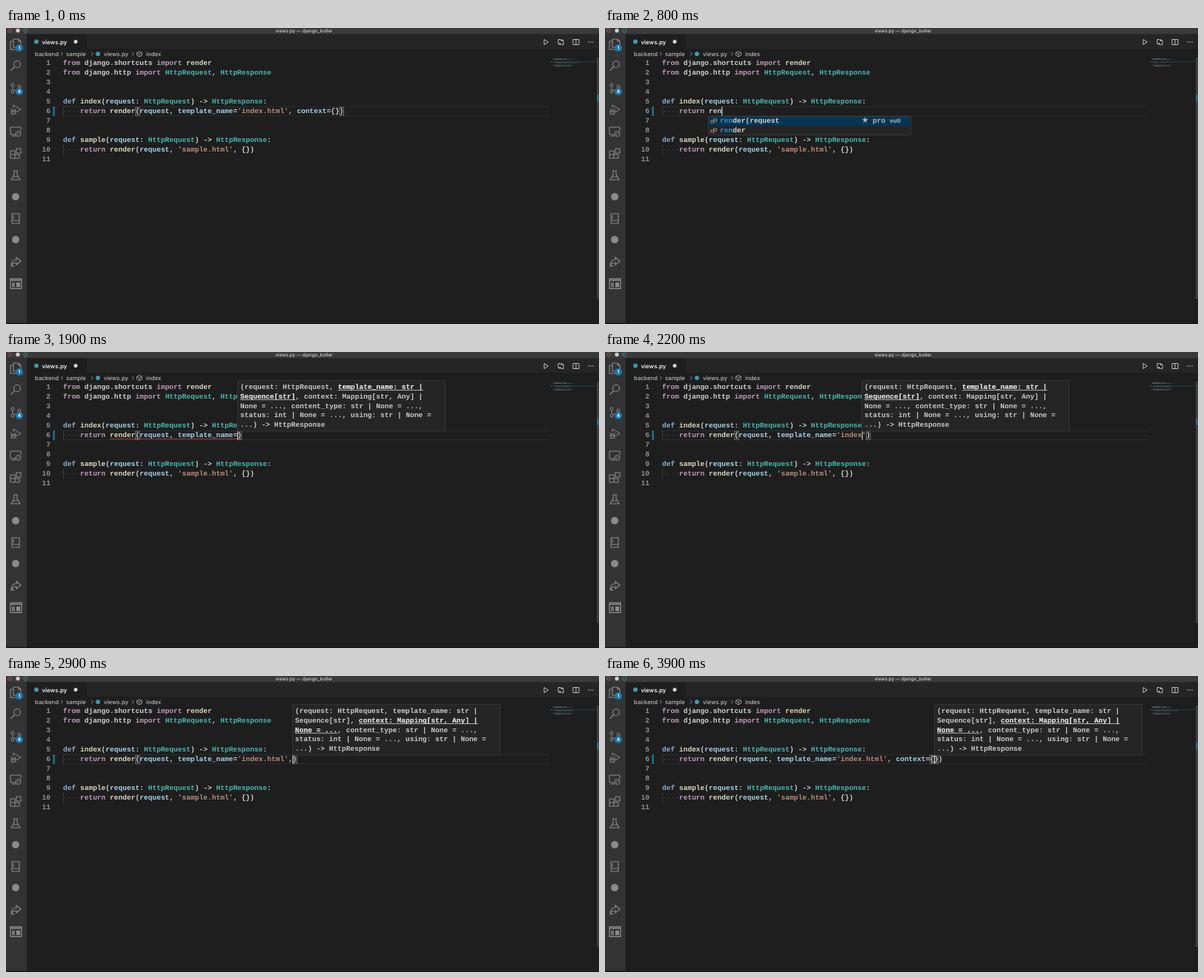
An HTML page with a canvas that plays this animation: 800x400 px, repeating every 4 s.

```html
<!DOCTYPE html>
<html lang="en">
<head>
<meta charset="utf-8">
<title>Editor</title>
<style>
html, body { margin: 0; width: 800px; height: 400px; overflow: hidden; background: #1e1e1e; }
canvas { display: block; width: 800px; height: 400px; }
</style>
</head>
<body>
<canvas id="stage" width="800" height="400"></canvas>
<script>
const ctx = document.getElementById('stage').getContext('2d');
const LOOP = 4000, STEP = 100;
const CHAR = 5.735, LEFT = 77, TOP = 41, ROW = 13;
const MONO = 'bold 9.56px "Liberation Mono", monospace';
const ui = (size, weight = 400) => `${weight} ${size}px Inter, sans-serif`;

const LINES = [
  'from django.shortcuts import render',
  'from django.http import HttpRequest, HttpResponse',
  '', '',
  'def index(request: HttpRequest) -> HttpResponse:',
  '',
  '', '',
  'def sample(request: HttpRequest) -> HttpResponse:',
  "    return render(request, 'sample.html', {})",
  ''
];
const SIGNATURE = [
  '(request: HttpRequest, template_name: str |',
  'Sequence[str], context: Mapping[str, Any] |',
  'None = ..., content_type: str | None = ...,',
  'status: int | None = ..., using: str | None =',
  '...) -> HttpResponse'
];
// Active parameter: [row, column, length]
const PARAMS = [
  [[0, 1, 20]],
  [[0, 23, 20], [1, 0, 13]],
  [[1, 15, 28], [2, 0, 10]]
];
const R_WORDS = 'request render return repr reversed range round raise reload reduce register resolve'.split(' ');
const RENDER = ['render(request', 'render'];
const T_WORDS = 'template_name= tuple type try True'.split(' ');
const C_WORDS = 'context= content_type= class continue chr callable classmethod complex compile copy count create'.split(' ');

const CALL = 'return render(request';
const NAMED = CALL + ', template_name=';
const PAGE = NAMED + "'index.html'";
// "|" marks the caret; list = [word column, matched text, items]
const STATES = [
  { at: 0, code: PAGE + ', context={})|', hideCaret: true },
  { at: 100, code: '|', error: true },
  { at: 200, code: 'r|', error: true, list: [4, 'r', R_WORDS] },
  { at: 300, code: 'ret|', error: true, list: [4, 'ret', ['return', ...RENDER]] },
  { at: 400, code: 'return |', error: true, list: [11, 'ret', RENDER] },
  { at: 500, code: 'return |' },
  { at: 600, code: 'return r|', list: [11, 'r', R_WORDS] },
  { at: 700, code: 'return re|', list: [11, 're', RENDER] },
  { at: 800, code: 'return ren|', list: [11, 'ren', RENDER] },
  { at: 900, code: 'return render|', list: [11, 'render', RENDER] },
  { at: 1000, code: 'return render(|)', sig: 0 },
  { at: 1100, code: 'return render(re|)', sig: 0, list: [18, 're', R_WORDS] },
  { at: 1200, code: CALL + '|)', sig: 0, wave: '#c8c8b8' },
  { at: 1400, code: CALL + ',|)', sig: 1 },
  { at: 1500, code: CALL + ', |)', sig: 1 },
  { at: 1600, code: CALL + ', t|)', sig: 1, list: [27, 't', T_WORDS] },
  { at: 1700, code: CALL + ', tem|)', sig: 1, list: [27, 'tem', T_WORDS.slice(0, 1)] },
  { at: 1800, code: NAMED + '|)', sig: 1, wave: '#d04a45' },
  { at: 2000, code: NAMED + "'|')", sig: 1 },
  { at: 2100, code: NAMED + "'in|')", sig: 1 },
  { at: 2200, code: NAMED + "'index|')", sig: 1 },
  { at: 2300, code: NAMED + "'index.|')", sig: 1 },
  { at: 2400, code: NAMED + "'index.th|')", sig: 1 },
  { at: 2500, code: NAMED + "'index.thml|')", sig: 1 },
  { at: 2600, code: NAMED + "'index.t|')", sig: 1 },
  { at: 2700, code: NAMED + "'index.|')", sig: 1 },
  { at: 2800, code: NAMED + "'index.html|')", sig: 1 },
  { at: 2900, code: PAGE + ',|)', sig: 2 },
  { at: 3000, code: PAGE + ', c|)', sig: 2, list: [55, 'c', C_WORDS.slice(0, 5)] },
  { at: 3100, code: PAGE + ', co|)', sig: 2, list: [55, 'co', C_WORDS] },
  { at: 3200, code: PAGE + ', context=...|)', sig: 2, selected: 3 },
  { at: 3700, code: PAGE + ', context={|})', sig: 2 }
];

const COLORS = {
  from: '#b99bb6', import: '#b99bb6', return: '#b99bb6', def: '#8eadc8',
  HttpRequest: '#45b8ad', HttpResponse: '#45b8ad',
  request: '#a3d3e6', template_name: '#a3d3e6', context: '#a3d3e6',
  render: '#d8d6c0', index: '#d8d6c0', sample: '#d8d6c0'
};
const colX = col => LEFT + col * CHAR;
const rowY = row => TOP + row * ROW;

function rect(x, y, w, h, color) {
  ctx.fillStyle = color;
  ctx.fillRect(x, y, w, h);
}
function frame(x, y, w, h, color, width = 1) {
  ctx.strokeStyle = color;
  ctx.lineWidth = width;
  ctx.strokeRect(x, y, w, h);
}
function text(value, x, y, color, font = MONO, align = 'left') {
  ctx.font = font;
  ctx.fillStyle = color;
  ctx.textAlign = align;
  ctx.fillText(value, x, y);
}
function disc(x, y, r, color) {
  ctx.fillStyle = color;
  ctx.beginPath();
  ctx.arc(x, y, r, 0, Math.PI * 2);
  ctx.fill();
}
function stroke(path, color, width = 1) {
  ctx.strokeStyle = color;
  ctx.lineWidth = width;
  ctx.stroke(new Path2D(path));
}
function tokens(line, visit) {
  for (const match of line.matchAll(/'[^']*'?|\w+|[^\w\s']+/g)) {
    const word = match[0];
    visit(word, match.index, word[0] === "'" ? '#b98d7c' : COLORS[word] || '#cfcfcf');
  }
}
function squiggle(col, length, row, color) {
  const x = colX(col), y = rowY(row) + 11.5;
  ctx.beginPath();
  for (let i = 0; i <= length * CHAR; i += 1.5) ctx.lineTo(x + i, y + (i / 1.5 % 2 ? 0.8 : -0.8));
  ctx.strokeStyle = color;
  ctx.lineWidth = 0.8;
  ctx.stroke();
}

function drawActivityBar() {
  const gray = '#8b8b8b';
  rect(0, 8, 28, 392, '#333333');
  stroke('M10 15H17L20 18V26H10ZM10 18H6V29H15V26M17 15V18H20', gray, 1.1);
  stroke('M19.5 49A4.5 4.5 0 1 1 10.5 49A4.5 4.5 0 1 1 19.5 49M11.5 52.5L6.5 57.5', gray, 1.2);
  stroke('M11 77A2 2 0 1 1 7 77A2 2 0 1 1 11 77M11 86A2 2 0 1 1 7 86A2 2 0 1 1 11 86M20 79A2 2 0 1 1 16 79A2 2 0 1 1 20 79M9 79V84M18 81Q17 84 11 84', gray);
  stroke('M10 108V104L20 110L13 114M6 109L8 111M14 109L12 111M6 113H14M6 117L8 115M14 117L12 115M8 111H12V116Q10 118 8 116Z', gray);
  stroke('M13 144H6V134H20V139M8 146H13M20 143A3.5 3.5 0 1 1 13 143A3.5 3.5 0 1 1 20 143M15 142L16.5 143.5L15 145M18.5 141L17.5 142.5', gray);
  stroke('M6 166H12V176H6ZM6 171H18V176H12M12 171H18V176M14 163H20V169H14Z', gray, 1.1);
  stroke('M10 193H16M11 193V198L7 205H19L15 198V193M9 201H17', gray, 1.1);
  disc(13, 228, 5, gray);
  stroke('M8 251H18V264H8ZM8 260H18M10 253V258', gray, 1.1);
  disc(13, 286, 5, gray);
  stroke('M14 310L20 315L14 320V317Q9 317 7 321Q7 313 14 313ZM8 318A2 2 0 1 0 11 321', gray, 1.2);
  stroke('M6 339H21V352H6ZM6 341H21M8 345H12M8 347H12M8 349H12', gray, 1.3);
  rect(14, 344, 5, 6, gray);
  for (const [y, count] of [[27, '1'], [86, '4']]) {
    disc(18, y, 5, '#1777ae');
    text(count, 18, y + 2.4, '#ffffff', ui(6.5, 700), 'center');
  }
}

function drawChrome() {
  rect(0, 0, 800, 400, '#1e1e1e');
  rect(0, 0, 800, 8.5, '#3a3a3b');
  stroke('M7.3 3.5A2.3 2.3 0 1 1 2.7 3.5A2.3 2.3 0 1 1 7.3 3.5', '#8f544d', 1.1);
  disc(16, 3.5, 2.7, '#d0cbc2');
  stroke('M28.6 3.5A2.3 2.3 0 1 1 24 3.5A2.3 2.3 0 1 1 28.6 3.5', '#38857a', 1.1);
  text('views.py — django_boller', 402, 5.8, '#d2d2d2', ui(6.3, 500), 'center');

  rect(28, 8.5, 772, 19.5, '#252526');
  rect(28, 8.5, 81, 19.5, '#1e1e1e');
  disc(41, 18.5, 3, '#3b9ba5');
  text('views.py', 48.5, 21.5, '#f0f0f0', ui(7.8, 600));
  disc(94, 18.5, 2.5, '#d6dddd');

  const icon = '#c0c0c0';
  stroke('M726 15.5L731.5 19L726 22.5Z', icon);
  stroke('M748 15.5H745V21.5H748M749 22.5H752V16.5H749M747 20L748.5 21.5L747 23M750 15L748.5 16.5L750 18', icon);
  stroke('M765 15.5H773V22.5H765ZM769 15.5V22.5', icon);
  for (const x of [786, 789, 792]) disc(x, 19, 0.8, icon);

  const crumbs = [['backend', 39], ['sample', 81], ['views.py', 132], ['index', 189]];
  for (const [label, x] of crumbs) text(label, x, 37.7, '#bababa', ui(7.8, 500));
  for (const x of [74, 115, 170]) stroke(`M${x} 32.5L${x + 2.5} 35L${x} 37.5`, '#999999', 0.9);
  disc(124, 35, 3, '#3b9ba5');
  stroke('M180 31.5L183.5 33.2V37L180 38.7L176.5 37V33.2ZM176.5 33.2L180 35L183.5 33.2M180 35V38.7', '#a59aad', 0.9);
  drawActivityBar();
  rect(0, 398.5, 800, 1.5, '#18181a');
}

function drawMinimap(lines, state) {
  lines.forEach((line, row) => {
    const y = 41 + row * 1.1;
    tokens(line, (word, col, color) => {
      ctx.globalAlpha = 0.4;
      rect(738 + col * 0.53, y, word.length * 0.53, 0.8, state.error && row > 3 ? '#d35a55' : color);
      ctx.globalAlpha = 1;
    });
  });
  rect(735, 45, 2, 1.3, '#1f6986');
  rect(738, 45.3, 58, 1, state.error ? '#6a3032' : '#213f4a');
  rect(797, 40, 3, 326, '#3e3e3e');
  rect(797, 90, 3, 9, '#286872');
}

function drawBrackets(code, caret) {
  const curly = code[caret - 1] === '{' && code[caret] === '}';
  const open = curly ? caret - 1 : code.indexOf('(');
  const close = curly ? caret : code.lastIndexOf(')');
  if (open < 0 || close < 0) return;
  for (const col of [open, close]) frame(colX(col + 4) + 0.3, rowY(5) + 1.2, CHAR - 0.4, 11, '#858585', 0.8);
}

function drawCode(state) {
  const caret = state.code.indexOf('|');
  const code = state.code.replace('|', '');
  const lines = LINES.map((line, row) => row === 5 ? '    ' + code : line);

  if (state.selected) {
    rect(colX(4 + caret - state.selected), rowY(5), state.selected * CHAR, ROW, '#43738a');
  } else {
    rect(LEFT, rowY(5), 657, 1, '#2b2b2b');
    rect(LEFT, rowY(6) - 1, 657, 1, '#2b2b2b');
  }
  rect(63.5, rowY(5), 2.3, ROW, '#1f7799');

  lines.forEach((line, row) => {
    const base = rowY(row) + 9.2;
    text(row + 1, 60, base, '#8f9396', MONO, 'right');
    if (line.startsWith('    ')) {
      rect(LEFT, rowY(row), 0.8, ROW, '#404040');
      for (let i = 0; i < 4; i++) disc(colX(i + 0.5), rowY(row) + 6.5, 0.65, '#505050');
    }
    tokens(line, (word, col, color) => {
      if (state.error && row === 4 && word === 'request') color = '#73909c';
      text(word, colX(col), base, color);
    });
  });

  if (!state.selected) drawBrackets(code, caret);
  if (state.wave) squiggle(11, code.length - 7, 5, state.wave);
  if (state.error) {
    squiggle(35, 12, 4, '#d04a45');
    squiggle(0, 3, 8, '#d04a45');
  }
  if (!state.hideCaret && !state.selected) rect(colX(4 + caret), rowY(5) + 0.5, 1.1, 12, '#d8d8d8');
  drawMinimap(lines, state);
  return colX(4 + caret);
}

function drawSignature(caretX, active) {
  const x = Math.floor(caretX), baseline = row => 50 + row * 12.75;
  rect(x, 38, 281, 69, '#252526');
  frame(x + 0.5, 38.5, 280, 68.5, '#343435');
  SIGNATURE.forEach((line, row) => text(line, x + 4, baseline(row), '#c8c8c8'));
  for (const [row, col, length] of PARAMS[active]) {
    const start = x + 4 + col * CHAR;
    text(SIGNATURE[row].substr(col, length), start, baseline(row), '#d4d4d4');
    rect(start, baseline(row) + 1.2, length * CHAR, 0.9, '#c4c4c4');
  }
}

function drawList([col, match, items]) {
  const x = Math.round(colX(col)) - 1, top = rowY(6), height = items.length * ROW;
  rect(x, top, 274, height, '#252526');
  rect(x, top, 274, ROW, '#063553');
  frame(x + 0.5, top + 0.5, 273, height - 1, '#36393c');
  items.forEach((item, row) => {
    const y = top + row * ROW, base = y + 9.2;
    frame(x + 4, y + 6, 4, 3, '#b58878', 0.9);
    frame(x + 7.5, y + 4, 4, 3, '#b58878', 0.9);
    let found = 0;
    [...item].forEach((letter, i) => {
      const hit = letter === match[found];
      if (hit) found++;
      text(letter, x + 16 + i * CHAR, base, hit ? '#2492d0' : '#d0d4d6');
    });
    if (item.includes('(')) {
      text('★', x + 207, base, '#a9bac4', '11px "DejaVu Sans", sans-serif');
      text('pro', x + 222, base, '#a9bac4');
      text('vuti', x + 245, base, '#a9bac4', ui(8, 700));
    }
  });
}

function draw(time) {
  const now = Math.floor(time % LOOP / STEP) * STEP;
  const state = STATES.findLast(item => item.at <= now);
  ctx.textRendering = 'geometricPrecision';
  ctx.textBaseline = 'alphabetic';
  drawChrome();
  const caretX = drawCode(state);
  if (state.sig !== undefined) drawSignature(caretX, state.sig);
  if (state.list) drawList(state.list);
}

const start = performance.now();
function tick() {
  draw(performance.now() - start);
  requestAnimationFrame(tick);
}
tick();
</script>
</body>
</html>
```
